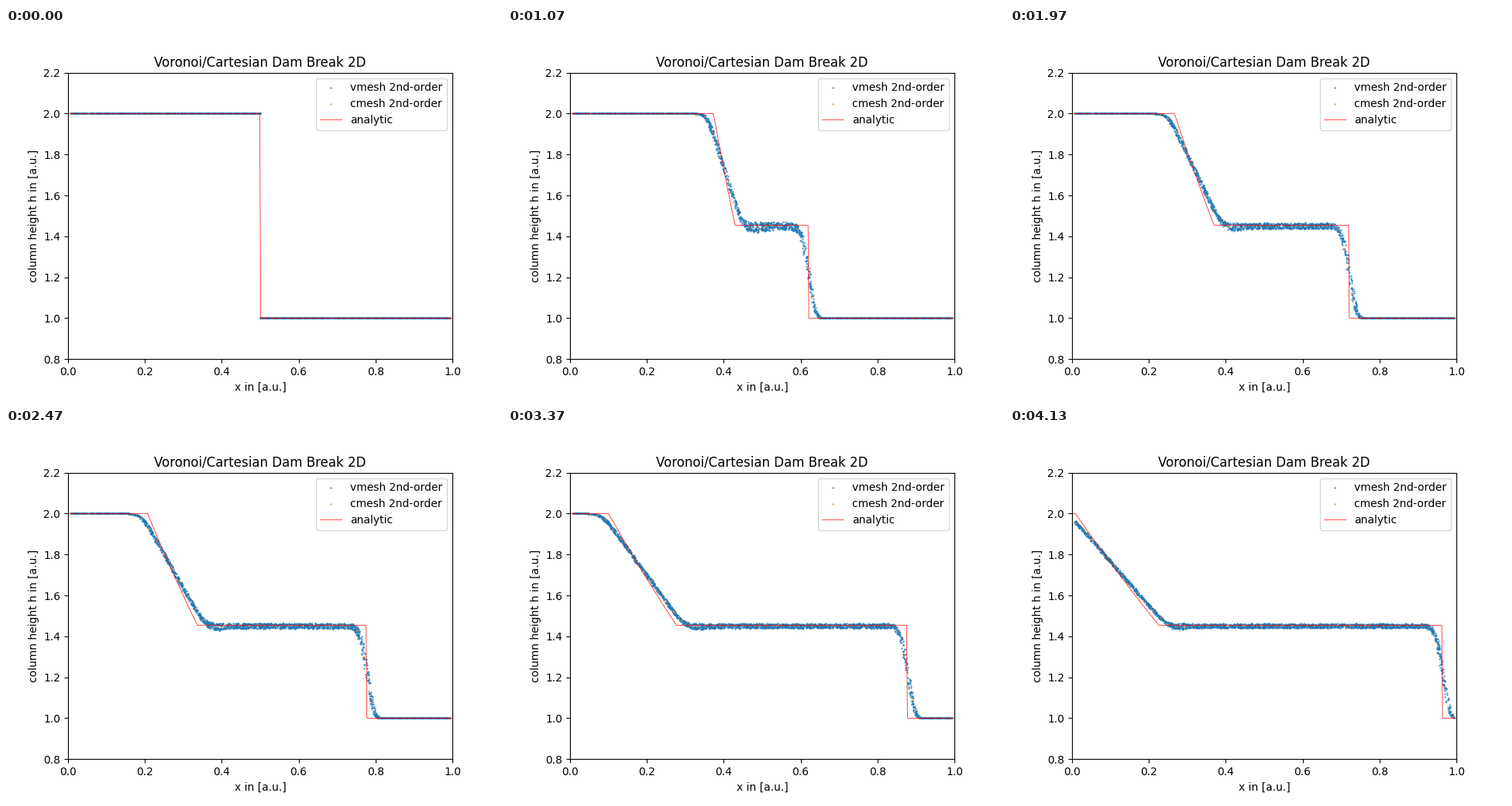
These frames come from a looping animation (640x480 px, 4.16 s). A matplotlib script:

```python
import math

import matplotlib.pyplot as plt
import numpy as np
from matplotlib.animation import FuncAnimation

FRAMES, LOOP_MS = 125, 4160
DT = 0.0028
H_LEFT, H_RIGHT, X_DAM = 2.0, 1.0, 0.5
C_LEFT = math.sqrt(H_LEFT)

erf = np.vectorize(math.erf, otypes=[float])


def middle_height():
    """Height between rarefaction and shock, by bisection (g = 1)."""
    lo, hi = H_RIGHT, H_LEFT
    for _ in range(50):
        h = (lo + hi) / 2
        shock = (h - H_RIGHT) * math.sqrt((h + H_RIGHT) / (2 * h * H_RIGHT))
        if 2 * (C_LEFT - math.sqrt(h)) > shock:
            lo = h
        else:
            hi = h
    return h


H_MID = middle_height()
C_MID = math.sqrt(H_MID)
U_MID = 2 * (C_LEFT - C_MID)
V_SHOCK = H_MID * U_MID / (H_MID - H_RIGHT)


def analytic(x, t):
    if t == 0:
        return np.where(x <= X_DAM, H_LEFT, H_RIGHT)
    xi = (x - X_DAM) / t
    fan = (2 * C_LEFT - np.clip(xi, -C_LEFT, U_MID - C_MID)) ** 2 / 9
    return np.where(xi < V_SHOCK, fan, H_RIGHT)


def cdf(z):
    return 0.5 * (1 + erf(z / math.sqrt(2)))


def ramp(d, s):
    """max(d, 0) with its corner rounded over a width s."""
    z = d / s
    return s * np.exp(-z * z / 2) / math.sqrt(2 * math.pi) + d * cdf(z)


def numeric(x, t, wobble=0.0):
    """Exact solution smeared by the scheme, plus ripples on the plateau."""
    if t == 0:
        return analytic(x, t)
    spread = 0.018 * (1 - math.exp(-t / 0.02))
    head = X_DAM - C_LEFT * t - spread
    tail = X_DAM + (U_MID - C_MID) * t + spread
    s = 0.0268 * t ** (1 / 3)
    slope = (H_LEFT - H_MID) / (tail - head)
    fan = H_LEFT - slope * (ramp(x - head, s) - ramp(x - tail, s))

    d = x - X_DAM - V_SHOCK * t
    width = 0.0158 * (1 - math.exp(-t / 0.01))
    past = cdf(d / width * (1 + 8 * np.clip(d, 0, 0.1)))

    plateau = cdf((x - tail) / 0.01) * (1 - past) ** 2
    bump = np.exp(-(((x - tail - 0.03) / 0.03) ** 2))
    early = math.exp(-t / 0.1)
    size = (0.010 + 0.022 * early) * (1 + 0.35 * bump)
    ripple = wobble * size - 0.003 - (0.003 + 0.01 * early) * bump
    return fan - (H_MID - H_RIGHT) * past + plateau * ripple


rng = np.random.default_rng(4)
CELLS = 2500
x_v = rng.uniform(0.006, 0.994, CELLS)
shift = rng.uniform(-0.0045, 0.0045, CELLS)
phase = rng.uniform(0, 2 * math.pi, CELLS)
rate = rng.uniform(20, 60, CELLS)
gain = rng.uniform(0.5, 1.1, CELLS)
x_c = np.arange(50) * 0.02 + 0.01
x_a = np.linspace(0, 1, 500)

fig, ax = plt.subplots(figsize=(6.4, 4.8), dpi=100)
dots_v = ax.scatter(x_v, analytic(x_v, 0), s=1, marker=".", label="vmesh 2nd-order")
dots_c = ax.scatter(x_c, analytic(x_c, 0), s=1, marker=".", label="cmesh 2nd-order")
line, = ax.plot(x_a, analytic(x_a, 0), color="red", lw=0.5, label="analytic")
ax.set(xlim=(0, 1), ylim=(0.8, 2.2), xlabel="x in [a.u.]",
       ylabel="column height h in [a.u.]",
       title="Voronoi/Cartesian Dam Break 2D")
ax.legend(loc="upper right")


def update(i):
    t = i * DT
    wobble = gain * np.sin(phase + rate * t)
    h_v = numeric(x_v + shift, t, wobble) if i else analytic(x_v, 0)
    dots_v.set_offsets(np.column_stack([x_v, h_v]))
    dots_c.set_offsets(np.column_stack([x_c, numeric(x_c, t)]))
    line.set_ydata(analytic(x_a, t))
    return dots_v, dots_c, line


anim = FuncAnimation(fig, update, frames=FRAMES, interval=LOOP_MS / FRAMES,
                     repeat=True, repeat_delay=0)
plt.show()
```
